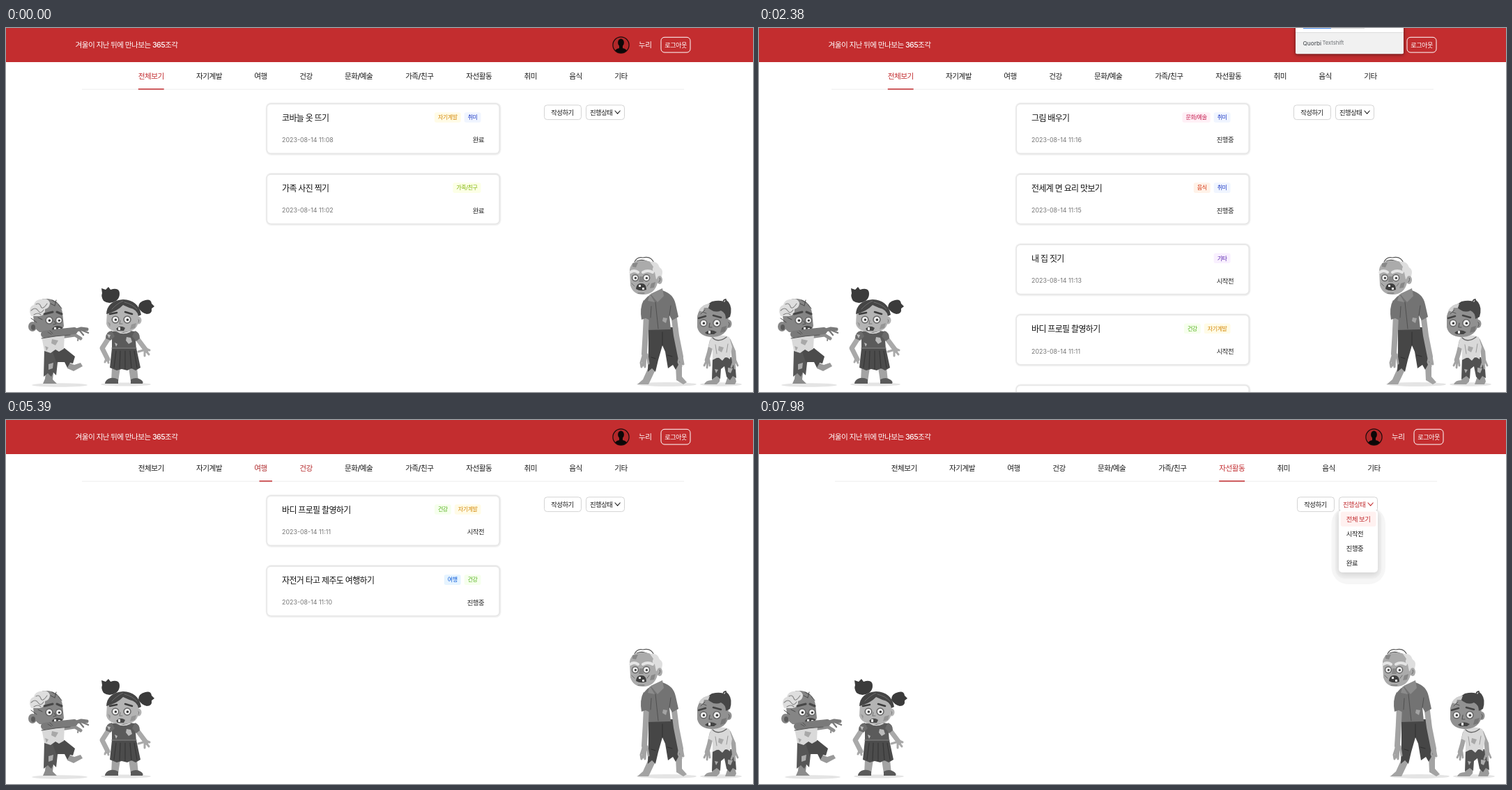
Write an HTML page with a canvas that moves like this. It is 1072 px wide and 523 px high and loops after 8 s.

```html
<!DOCTYPE html>
<html lang="ko">
<head>
<meta charset="utf-8">
<style>
html, body { margin: 0; width: 100%; height: 100%; overflow: hidden; background: #fff; }
canvas { display: block; width: 1072px; height: 523px; }
</style>
</head>
<body>
<canvas id="stage" width="1072" height="523"></canvas>
<script>
const W = 1072, H = 523, LOOP = 8000, STEP = 70;
const screen2d = document.getElementById('stage').getContext('2d');
let g = screen2d;
const RED = [194, 45, 48], FONT = 'Inter, "Noto Sans CJK KR", "Noto Sans CJK", sans-serif';

// ---------- helpers ----------
const clamp = v => Math.min(1, Math.max(0, v));
function ease(x) { // cubic-bezier(.25, .1, .25, 1)
  x = clamp(x);
  let lo = 0, hi = 1, s = x;
  for (let i = 0; i < 18; i++) {
    s = (lo + hi) / 2;
    const bx = .75 * s * (1 - s) * (1 - s) + .75 * s * s * (1 - s) + s * s * s;
    if (bx < x) lo = s; else hi = s;
  }
  return .3 * s * (1 - s) * (1 - s) + 3 * s * s * (1 - s) + s * s * s;
}
const toRed = (k, from = 25) => `rgb(${RED.map(c => Math.round(from + (c - from) * k))})`;

function rect(x, y, w, h, r, fill, stroke) {
  g.beginPath();
  g.roundRect(x, y, w, h, r);
  if (fill) { g.fillStyle = fill; g.fill(); }
  if (stroke) { g.strokeStyle = stroke; g.lineWidth = 1; g.stroke(); }
}
function shadow(color, blur, dy = 0) {
  g.shadowColor = color; g.shadowBlur = blur; g.shadowOffsetY = dy;
}
const noShadow = () => shadow('transparent', 0);
function setFont(s, size, weight = 400) {
  g.font = `${weight} ${size}px ${FONT}`;
  g.letterSpacing = (/[가-힣]/.test(s) ? -.054 * size : 0) + 'px';
}
function text(s, x, cy, size, color, weight, right) {
  setFont(s, size, weight);
  g.fillStyle = color;
  g.fillText(s, right ? x - g.measureText(s).width : x, cy + .365 * size);
}
function fill(c, d) { g.fillStyle = c; g.fill(new Path2D(d)); }
function line(c, w, d) {
  g.strokeStyle = c; g.lineWidth = w; g.lineCap = g.lineJoin = 'round';
  g.stroke(new Path2D(d));
}
function oval(c, x, y, rx, ry = rx) {
  g.fillStyle = c;
  g.beginPath(); g.ellipse(x, y, rx, ry, 0, 0, 7); g.fill();
}
function eye(x, y, r) {
  oval('#666', x, y, r + 1.5);
  oval('#eee', x, y, r);
  oval('#333', x + .4, y + .2, r * .4);
}

// ---------- zombies ----------
function walker() {
  oval('#e4e4e4', 77, 513, 40, 2.8);
  fill('#8c8c8c', 'M57 494L68 496 67 505 73 511 53 511 56 504Z');
  fill('#999', 'M87 480L98 484 107 481 110 486 97 493 88 489Z');
  fill('#565656', 'M55 462L80 464 74 481 72 499 68 495 65 501 60 496 54 501Z');
  fill('#4b4b4b', 'M66 462L84 460 99 472 96 482 92 481 88 488 84 480 72 480Z');
  fill('#aaa', 'M61 483l7-2-1 8-6 2z');
  line('#8e8e8e', 5, 'M78 444L99 441 107 446');
  line('#8e8e8e', 2, 'M104 443L103 449');
  fill('#d9d9d9', 'M50 438Q62 434 84 440L83 461 76 465 71 462 64 467 55 464Z');
  fill('#a8a8a8', 'M66 447l9 2-4 7-6-3zM56 457l5 2-3 5z');
  fill('#858585', 'M38 404Q42 388 60 389 78 391 81 409L83 428Q80 439 64 438L48 437Q40 432 40 422Z');
  fill('#dedede', 'M34 408Q34 399 40 398 42 389 52 390 60 387 63 395 63 402 56 404 57 413 48 414L36 414Z');
  line('#858585', 1.1, 'M36 406Q42 400 46 406T54 405M43 397Q48 394 50 400T59 396M40 412Q46 408 50 412');
  line('#4b4b4b', 1, 'M66 391L73 395M64 396L70 399M72 391L70 399M75 397L80 403M46 416L52 419M36 417L44 423');
  oval('#858585', 38, 429, 6, 7);
  oval('#5b5b5b', 39, 430, 3, 4);
  eye(62, 420, 4.2); eye(76, 420, 3.8);
  line('#474747', 3, 'M55 411L67 408M73 408L80 411');
  line('#555', 1.2, 'M69 421L72 425 68 426');
  fill('#444', 'M66 432Q72 425 81 430L79 435 67 436Z');
  fill('#eee', 'M69 430h3v3h-3zM75 431h3v3h-3z');
  line('#7a7a7a', 10, 'M55 440Q76 437 98 435');
  line('#7a7a7a', 5, 'M98 435L108 432 116 433');
  line('#7a7a7a', 2.4, 'M108 434L118 438M106 435L111 441');
  line('#555', 1, 'M51 446Q72 442 92 441M60 437l5 3M63 435l4 4');
}
function girl() {
  oval('#e4e4e4', 172, 512, 36, 2.6);
  fill('#3b3b3b', 'M158 392Q148 398 140 392 136 386 138 381L137 374 143 376 147 372 150 376Q163 372 163 382 163 388 158 392Z');
  fill('#3b3b3b', 'M190 402Q190 393 200 391 208 389 209 396L213 400 209 403Q210 411 202 411 194 409 190 402Z');
  fill('#a3a3a3', 'M152 488L164 488 161 508 151 508ZM176 488L188 488 190 508 179 508Z');
  fill('#5a5a5a', 'M147 504Q154 501 161 505V511H142Q142 507 147 504ZM179 505Q187 501 193 505 198 508 196 511H179Z');
  line('#a9a9a9', 7, 'M147 446L138 460 146 476');
  line('#a9a9a9', 3, 'M146 476L147 481M144 475L142 480');
  line('#a9a9a9', 7, 'M189 447L201 463');
  line('#a9a9a9', 3, 'M201 461L206 463M201 464L205 469M199 465L199 471M190 465L197 463');
  fill('#5b5b5b', 'M152 436Q170 433 185 436L187 462H152Z');
  fill('#4c4c4c', 'M152 460H187L193 488 186 492 180 489 174 492 166 490 159 492 149 488Z');
  line('#373737', 1.2, 'M158 464L155 488M164 464L163 489M171 464L171 490M178 464L180 489M184 464L188 488');
  line('#777', 1.4, 'M152 460H187');
  fill('#6b6b6b', 'M152 435Q143 436 143 446L150 449 156 443ZM185 435Q192 437 192 446L187 450 181 443Z');
  fill('#bbb', 'M173 444l6 1 2 6-5 3-4-5zM145 440l5 1-2 5zM156 452l4 2-2 4z');
  line('#ddd', 1.6, 'M160 436Q168 441 178 436');
  oval('#b4b4b4', 190, 420, 4.5, 5.5);
  line('#777', 1, 'M189 418Q192 419 190 423');
  fill('#b4b4b4', 'M145 407Q150 394 170 395 188 397 190 412L189 426Q185 437 167 437 147 437 144 425Z');
  fill('#454545', 'M144 411Q145 392 168 390 190 391 194 412L190 414Q188 404 177 402L168 398Q160 407 144 411Z');
  line('#777', .8, 'M168 392Q158 397 152 404M170 394Q182 397 188 404');
  fill('#969696', 'M180 426l7-2-2 7-7 2zM146 422l4 3-1 5z');
  eye(157, 419, 4); eye(174, 419, 4.2);
  line('#3d3d3d', 2.6, 'M149 411L159 409M171 408L181 411');
  line('#777', 1.1, 'M164 420L163 425 167 425');
  fill('#4a4a4a', 'M158 432Q164 426 171 431L169 435H160Z');
  fill('#eee', 'M161 430h3v4h-3z');
}
function elder() {
  oval('#e4e4e4', 948, 512, 43, 3);
  fill('#a3a3a3', 'M923 485L933 489 925 506 922 512H906L914 505ZM961 484L970 480 970 501 977 509 972 512 962 506Z');
  fill('#464646', 'M922 430L964 430 966 457 972 484 966 482 961 491 957 484 950 489 946 465 942 456 936 477 932 494 927 489 921 494 922 463Z');
  line('#2f2f2f', 1, 'M942 437L942 456M949 470l7 2M926 473l6 2');
  line('#a3a3a3', 8, 'M958 410L962 442 968 472');
  line('#a3a3a3', 3, 'M967 470L965 480 967 485M970 472L972 483M968 472L969 486');
  fill('#737373', 'M916 391Q924 380 942 377 958 382 961 397L965 415 956 420 952 413 954 433 921 434Z');
  line('#a3a3a3', 8, 'M919 412Q918 440 916 468');
  line('#a3a3a3', 3, 'M915 468L911 481 912 487M918 470L917 487M920 469L922 482M916 468L914 485');
  fill('#737373', 'M915 391Q909 402 912 419L918 417 924 420 927 398Z');
  fill('#8b8b8b', 'M925 382L942 374 944 385 935 394ZM924 382L931 394 921 392Z');
  line('#505050', 1, 'M932 394L936 432M926 400L925 416M954 399L952 413');
  fill('#a3a3a3', 'M943 416l6 1-2 7-5-3z');
  line('#555', 1.1, 'M902 336Q906 328 914 330 926 327 930 338M905 335Q914 331 922 337');
  fill('#ababab', 'M895 347Q897 334 914 334 932 334 935 348L935 366Q931 383 914 383 900 383 896 370Z');
  fill('#dedede', 'M924 336Q935 334 938 344 944 347 941 357L933 361 931 351Q926 349 929 343Z');
  oval('#ababab', 938, 362, 4, 6);
  line('#666', 1, 'M938 359Q940 361 937 365');
  fill('#888', 'M899 338l8-1-3 7-5-1zM926 367l6-2-2 8-6 1z');
  eye(903, 359, 3.7); eye(919, 359, 3.9);
  line('#e5e5e5', 4, 'M896 351Q901 347 907 351M914 351Q921 347 928 351');
  fill('#888', 'M909 357L914 357 915 365 908 365Z');
  fill('#3f3f3f', 'M904 375Q905 366 912 367 919 367 919 376Q911 379 904 375Z');
  fill('#eee', 'M908 369h3v3h-3zM913 373h3v3h-3z');
  line('#666', .9, 'M898 367L902 371M923 367L920 371M907 381H916');
}
function boy() {
  oval('#e4e4e4', 1026, 512, 30, 2.8);
  fill('#9b9b9b', 'M1015 500L1025 500 1024 508 1020 512H1002Q1004 506 1013 506ZM1036 500L1046 500 1048 508 1046 512H1032Z');
  fill('#515151', 'M1014 474L1041 473 1047 490 1048 503 1043 500 1039 506 1034 501 1031 486 1026 490 1025 504 1020 500 1013 505Z');
  fill('#aaa', 'M1036 488l7 1-3 7-4-2zM1017 490l5 1-3 5z');
  line('#a3a3a3', 6.5, 'M1013 450L1009 467 1006 477');
  line('#a3a3a3', 2.8, 'M1006 477L1002 485M1007 478L1006 488M1009 477L1010 485');
  line('#a3a3a3', 6.5, 'M1037 449L1044 465 1045 479');
  line('#a3a3a3', 2.8, 'M1044 479L1041 487M1045 479L1046 489M1047 478L1050 485');
  fill('#d9d9d9', 'M1012 443Q1026 439 1038 444L1042 458 1039 476 1033 472 1028 478 1022 473 1014 477 1014 461 1008 458Z');
  line('#999', 1, 'M1018 455L1020 468M1036 454L1034 466');
  fill('#a8a8a8', 'M1023 457l7 2-3 7-5-3z');
  line('#666', 1.4, 'M1014 445Q1022 453 1034 444');
  oval('#919191', 1037, 425, 4.5, 6);
  line('#555', 1, 'M1036 422Q1040 424 1037 429');
  fill('#919191', 'M992 414Q996 397 1013 396 1034 397 1037 414L1036 430Q1031 444 1012 444 995 443 992 430Z');
  fill('#464646', 'M1010 404L1004 399 1013 393Q1026 390 1031 394L1033 390 1037 394Q1043 402 1039 415L1033 418Q1033 409 1026 406 1018 410 1010 404Z');
  line('#464646', 1.8, 'M1030 395Q1028 391 1033 390');
  fill('#d0d0d0', 'M994 406Q1000 396 1010 396L1008 402 1002 402 1000 408Z');
  line('#555', 1, 'M997 411L1003 405M1000 408L1005 410');
  fill('#777', 'M1027 430l7-2-2 8-7 2z');
  eye(1001, 424, 4); eye(1020, 424, 4.4);
  line('#444', 2.6, 'M994 417L1004 414M1015 413L1026 416');
  line('#555', 1.2, 'M1010 424L1009 430 1013 430');
  fill('#444', 'M1003 438Q1011 431 1020 437L1016 440 1006 440Z');
  fill('#eee', 'M1008 435h3v4h-3z');
}
const zombies = document.createElement('canvas');
zombies.width = W; zombies.height = H;
g = zombies.getContext('2d');
[walker, girl, elder, boy].forEach(draw => draw());
g = screen2d;

// ---------- data ----------
const TAGS = {
  '자기계발': ['#d48806', '#fffbe6'], '여행': ['#0958d9', '#e6f4ff'],
  '건강': ['#52b01a', '#f6ffed'], '문화/예술': ['#c41d4f', '#fff0f6'],
  '가족/친구': ['#7cb305', '#fcffe6'], '취미': ['#1d39c4', '#f0f5ff'],
  '음식': ['#d4300d', '#fff2e8'], '기타': ['#531dab', '#f9f0ff']
};
const CARDS = [
  ['그림 배우기', '11:16', '진행중', '문화/예술', '취미'],
  ['전세계 면 요리 맛보기', '11:15', '진행중', '음식', '취미'],
  ['내 집 짓기', '11:13', '시작전', '기타'],
  ['바디 프로필 촬영하기', '11:11', '시작전', '건강', '자기계발'],
  ['자전거 타고 제주도 여행하기', '11:10', '진행중', '여행', '건강'],
  ['코바늘 옷 뜨기', '11:08', '완료', '자기계발', '취미'],
  ['외국어 회화 배우기', '11:05', '시작전', '자기계발'],
  ['가족 사진 찍기', '11:02', '완료', '가족/친구']
];
const TABS = ['전체보기', '자기계발', '여행', '건강', '문화/예술', '가족/친구', '자선활동', '취미', '음식', '기타'];
const GAP = 46.4;
const tabW = TABS.map(s => s.length * 9.22 - (s.includes('/') ? 5.4 : 0));
const tabX = TABS.map((_, i) => tabW.slice(0, i).reduce((a, w) => a + w + GAP, 189.8));

const RELOAD = 1890, READY = 2030, FADE = 300, HOVER = 170;
const CLICKS = [-2000, 4080, 4760, 5357, 5840, 6320, 6800]; // click time of each tab in turn

// ---------- parts ----------
function header(t, loading, wide) {
  g.fillStyle = '#c32d2f';
  g.fillRect(0, 0, W, 49);
  text('겨울이 지난 뒤에 만나보는 365조각', 99.5, 24, 10.65, '#fff', 500);
  if (loading) return;
  g.save();
  g.translate(wide ? 0 : -10, 0);
  g.save();
  g.beginPath(); g.arc(882.5, 24.5, 11.6, 0, 7); g.clip();
  g.fillStyle = '#b3282a'; g.fillRect(870, 12, 25, 25);
  oval('#0c0808', 882.5, 21, 4.4, 5.6);
  fill('#0c0808', 'M880 25H885V29Q892 30 893 38H872Q873 30 880 29Z');
  g.restore();
  g.beginPath(); g.arc(882.5, 24.5, 11.6, 0, 7);
  g.strokeStyle = '#1a0c0c'; g.lineWidth = 1.2; g.stroke();
  text('누리', 908, 24, 10.65, '#fff', 500);
  rect(940, 13.3, 42, 21.8, 5, null, '#fff');
  text('로그아웃', 945.3, 24.3, 9.1, '#fff', 500);
  g.restore();
}

function tabs(t, loading) {
  g.fillStyle = '#ededed';
  g.fillRect(109, 87.6, 864, 1);
  TABS.forEach((s, i) => {
    const on = i in CLICKS ? ease((t - CLICKS[i] + HOVER) / FADE) : 0;
    const off = i + 1 in CLICKS ? ease((t - CLICKS[i + 1]) / FADE) : 0;
    text(s, tabX[i], 69.5, 10.65, toRed(on * (1 - off)), 500);
  });
  if (loading) return;
  const now = activeTab(t), prev = Math.max(0, now - 1), k = ease((t - CLICKS[now]) / FADE);
  const mid = a => a[prev] + (a[now] - a[prev]) * k;
  g.fillStyle = toRed(1);
  g.fillRect(mid(tabX), 87, mid(tabW), 1.5);
}
const activeTab = t => CLICKS.filter(c => c <= t).length - 1;

function card([title, time, state, ...tags], i) {
  const y = 108 + i * 101.1;
  if (y > H) return;
  rect(372.6, y - 1, 338, 76, 8, '#f3f3f3');
  rect(373.6, y, 335.8, 73.5, 7, '#e7e7e7');
  rect(375, y + 1.8, 332.4, 69.8, 5, '#fff');
  text(title, 396, y + 21.8, 12, '#141414', 500);
  text('2023-08-14 ' + time, 396, y + 53, 8.9, '#777');
  text(state, 686, y + 53, 9.4, '#222', 400, true);
  let right = 681.5;
  [...tags].reverse().forEach(s => {
    setFont(s, 8);
    const w = g.measureText(s).width + 10;
    rect(right - w, y + 13.2, w, 14.6, 2.7, TAGS[s][1]);
    text(s, right - w + 5, y + 20.4, 8, TAGS[s][0]);
    right -= w + 5;
  });
}

function buttons(t) {
  const passing = Math.sin(Math.PI * clamp((t - 7230) / 260));
  rect(772.5, 110.8, 53, 20.8, 4, '#fff', toRed(passing, 212));
  text('작성하기', 782.2, 121.2, 9.4, toRed(passing), 500);
  const hover = ease((t - 7670) / 200);
  rect(832.5, 110.8, 55, 20.8, 4, '#fff', '#d4d4d4');
  text('진행상태', 838, 121.2, 9.4, toRed(hover), 500);
  line(toRed(hover), 1.1, 'M874 119L877.6 123.2 881.2 119');
}

function menu(t) {
  const k = ease((t - 7760) / 200), pick = ease((t - 7790) / 180);
  if (!k) return;
  g.save();
  g.globalAlpha = k;
  g.translate(0, 129 * .2 * (1 - k));
  g.scale(1, .8 + .2 * k);
  g.beginPath(); // glow stays outside the open button
  g.rect(800, 105, 120, 150);
  g.rect(832, 110, 56, 19);
  g.clip('evenodd');
  rect(821.5, 125, 77.5, 111, 24, 'rgba(0,0,0,.035)');
  rect(827, 127, 66, 101, 14, 'rgba(0,0,0,.018)');
  shadow('rgba(0,0,0,.14)', 8, 3);
  rect(832, 129, 56, 90, 5, '#fff');
  noShadow();
  rect(834.7, 131.8, 50.8, 21.2, 3, `rgba(255,241,240,${pick})`);
  ['전체 보기', '시작전', '진행중', '완료'].forEach((s, i) =>
    text(s, 842.8, 142.4 + i * 21.1, 9.33, toRed(i ? 0 : pick), 400));
  g.restore();
}

function translatePanel() {
  shadow('rgba(0,0,0,.55)', 5, 1);
  rect(770, -10, 155, 47.3, 2, '#f1f1f1');
  noShadow();
  g.fillStyle = '#fff'; g.fillRect(770, 0, 155, 6.5);
  g.fillStyle = '#d5d5d5'; g.fillRect(770, 6.3, 155, .8);
  g.fillRect(821, 0, 48, .8);
  g.fillStyle = '#4a8df0'; g.fillRect(781, 0, 40, 1);
  text('Quorbi', 780.5, 21.7, 8.2, '#55595d', 500);
  text('Textshift', 808.5, 21.7, 7.6, '#6a6e72');
}

function statusBar(t) {
  const alpha = t < 1680 ? 0 : 1 - clamp((t - 2150) / 230);
  if (!alpha) return;
  g.save();
  g.globalAlpha = alpha;
  shadow('rgba(0,0,0,.25)', 9);
  rect(-8, 514.5, 368, 20, 3, '#4894f5');
  noShadow();
  text('equsyvfbitstiqlyzukm.supabase.co의 응답을 기다리는 중...', 3, 521.3, 8.4, '#0c1d38');
  g.restore();
}

// ---------- scene ----------
function visibleCards(t) {
  if (t < RELOAD) return CARDS.filter(c => c[2] === '완료');
  const i = activeTab(t);
  return i ? CARDS.filter(c => c.slice(3).includes(TABS[i])) : CARDS;
}
function scene(t) {
  const wide = t < RELOAD || t >= CLICKS[1]; // page without a scrollbar
  const loading = t >= RELOAD && t < READY;
  g.fillStyle = '#fff';
  g.fillRect(0, 0, W, H);
  header(t, loading, wide);
  g.save();
  g.translate(wide ? 0 : -5, 0);
  g.drawImage(zombies, 0, 0);
  tabs(t, loading);
  visibleCards(t).forEach(card);
  buttons(t);
  menu(t);
  g.restore();
  if (!wide) translatePanel();
  statusBar(t);
}
const start = performance.now();
function tick() {
  const t = (performance.now() - start) % LOOP;
  scene(Math.floor(t / STEP) * STEP);
  requestAnimationFrame(tick);
}
tick();
</script>
</body>
</html>
```
